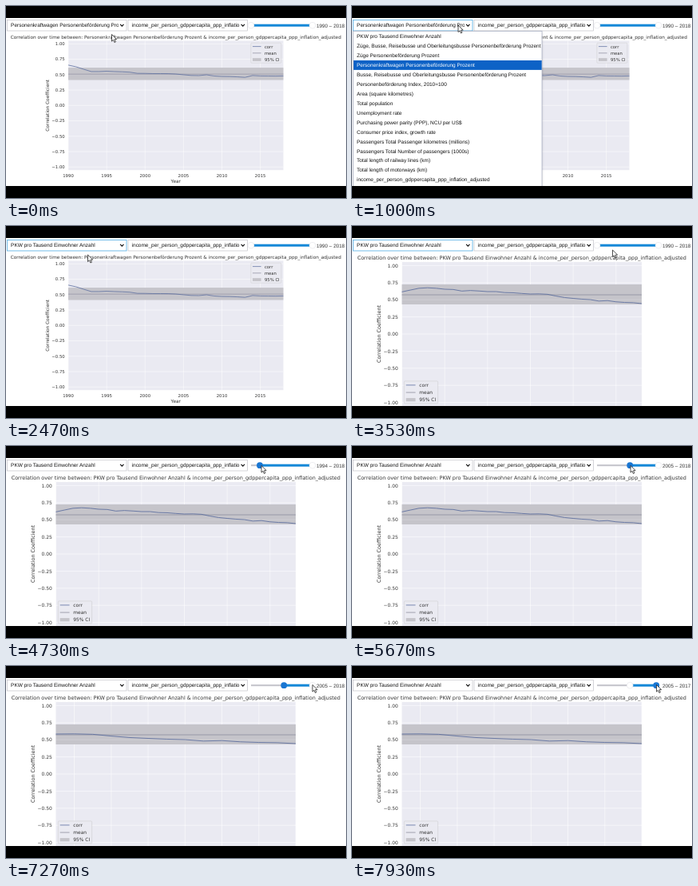
Animation of 426x240 px, one loop 8 s. Source, as an HTML page with a canvas:

```html
<!DOCTYPE html>
<html lang="de">
<head>
<meta charset="utf-8">
<title>Correlation over time</title>
<style>
html, body { margin: 0; width: 100%; height: 100%; overflow: hidden; background: #000; }
canvas { display: block; width: 426px; height: 240px; }
</style>
</head>
<body>
<canvas id="stage"></canvas>
<script>
const W = 426, H = 240, LOOP = 8000;
const SANS = '"Liberation Sans", Arial, sans-serif';
const PLOT = '"DejaVu Sans", sans-serif';
const UI = 6.47;

const canvas = document.getElementById('stage');
const dpr = window.devicePixelRatio || 1;
canvas.width = W * dpr;
canvas.height = H * dpr;
const ctx = canvas.getContext('2d');
ctx.scale(dpr, dpr);
ctx.textRendering = 'geometricPrecision';

const INCOME = 'income_per_person_gdppercapita_ppp_inflation_adjusted';
const OPTIONS = [
  'PKW pro Tausend Einwohner Anzahl',
  'Züge, Busse, Reisebusse und Oberleitungsbusse Personenbeförderung Prozent',
  'Züge Personenbeförderung Prozent',
  'Personenkraftwagen Personenbeförderung Prozent',
  'Busse, Reisebusse und Oberleitungsbusse Personenbeförderung Prozent',
  'Personenbeförderung Index, 2010=100',
  'Area (square kilometres)',
  'Total population',
  'Unemployment rate',
  'Purchasing power parity (PPP), NCU per US$',
  'Consumer price index, growth rate',
  'Passengers Total Passenger kilometres (millions)',
  'Passengers Total Number of passengers (1000s)',
  'Total length of railway lines (km)',
  'Total length of motorways (km)',
  INCOME
];

// Yearly correlation from 1990 to 2018, with mean and confidence band.
const CARS = {
  name: OPTIONS[3], mean: 0.508, band: [0.413, 0.613],
  corr: [.655, .628, .588, .55, .55, .556, .55, .546, .54, .521, .52, .517, .517, .516,
    .51, .498, .487, .485, .497, .478, .471, .469, .464, .456, .486, .479, .478, .477, .479]
};
const PKW = {
  name: OPTIONS[0], mean: 0.572, band: [0.432, 0.724],
  corr: [.615, .642, .668, .675, .668, .654, .65, .627, .635, .628, .619, .619, .605, .602,
    .592, .584, .586, .58, .554, .532, .52, .509, .502, .481, .488, .47, .461, .457, .444]
};

const SMALL = { pt: 0.484, x0: 78, x1: 347.5, y0: 124.3, unit: 77, top: true };
const LARGE = { pt: 0.539, x0: 62.5, x1: 363, y0: 135, unit: 85.6, top: false };

const T = { open: 560, pick: 2250, redraw: 2950, press: 4330, zoom: 5950, grab: 7330 };

// Keyframes: [time, value, value...]
const MOUSE = [
  [0, 132.5, 35.5], [400, 133, 24], [1250, 133, 24], [1850, 102.5, 36], [2650, 102.5, 36],
  [3450, 326.5, 30], [3750, 326.5, 30], [4150, 309, 24], [4400, 309, 24], [4730, 320, 24.5],
  [5500, 349, 24.5], [6000, 349, 24.5], [6450, 390, 23.5], [6850, 390, 23.5],
  [7250, 384, 23.5], [7500, 384, 23.5], [7850, 381.5, 23.5], [8000, 381.5, 23.5]
];
const FROM = [[4400, 1990], [4730, 1994], [5500, 2005]];
const TO = [[7500, 2018], [7850, 2017]];

function track(keys, t, i) {
  if (t <= keys[0][0]) return keys[0][i];
  for (let k = 1; k < keys.length; k++) {
    const a = keys[k - 1], b = keys[k];
    if (t <= b[0]) {
      const u = (t - a[0]) / (b[0] - a[0]);
      return a[i] + (b[i] - a[i]) * u * u * (3 - 2 * u);
    }
  }
  return keys[keys.length - 1][i];
}

function text(s, x, y, size, font, color, align = 'left') {
  ctx.font = size + 'px ' + font;
  ctx.fillStyle = color;
  ctx.textAlign = align;
  ctx.fillText(s, x, y);
}

function line(points, color, width) {
  ctx.beginPath();
  points.forEach(([x, y], i) => i ? ctx.lineTo(x, y) : ctx.moveTo(x, y));
  ctx.strokeStyle = color;
  ctx.lineWidth = width;
  ctx.stroke();
}

function rect(x, y, w, h, color) {
  ctx.fillStyle = color;
  ctx.fillRect(x, y, w, h);
}

const INK = '#333333', CORR = '#5b6d9e', MEAN = '#8d8d9f', BAND = '#c5c4ca';

function legend(f) {
  const { pt } = f;
  const w = 78.5 * pt, h = 52 * pt;
  const x = f.top ? f.x1 - 5.5 * pt - w : f.x0 + 5.2 * pt;
  const y = f.top ? f.y0 - 1.05 * f.unit + 5.5 * pt : f.y0 + 1.05 * f.unit - 5.5 * pt - h;
  ctx.beginPath();
  ctx.roundRect(x, y, w, h, 2 * pt);
  ctx.fillStyle = 'rgba(234,234,242,0.8)';
  ctx.fill();
  ctx.strokeStyle = '#cccccc';
  ctx.lineWidth = pt;
  ctx.stroke();
  const hx = x + 4.4 * pt, hw = 22 * pt;
  ['corr', 'mean', '95% CI'].forEach((label, i) => {
    const cy = y + (9.3 + 17 * i) * pt;
    if (i < 2) line([[hx, cy], [hx + hw, cy]], i ? MEAN : CORR, 1.5 * pt);
    else rect(hx, cy - 3.9 * pt, hw, 7.7 * pt, BAND);
    text(label, hx + 30.8 * pt, cy + 3.9 * pt, 11 * pt, PLOT, INK);
  });
}

function figure(f, data, start) {
  const { pt, x0, x1 } = f;
  const X = year => x0 + (year - start) / (2018 - start) * (x1 - x0);
  const Y = v => f.y0 - v * f.unit;
  const top = Y(1.05), bottom = Y(-1.05);
  rect(x0, top, x1 - x0, bottom - top, '#eaeaf2');

  const step = 2018 - start > 15 ? 5 : 2;
  for (let year = Math.ceil(start / step) * step; year <= 2018; year += step) {
    line([[X(year), top], [X(year), bottom]], '#fff', pt);
    text(year, X(year), bottom + 18.5 * pt, 11 * pt, PLOT, INK, 'center');
  }
  for (let i = -4; i <= 4; i++) {
    const y = Y(i / 4);
    line([[x0, y], [x1, y]], '#fff', pt);
    const label = (i < 0 ? '\u2212' : '') + Math.abs(i / 4).toFixed(2);
    text(label, x0 - 9 * pt, y + 4 * pt, 11 * pt, PLOT, INK, 'right');
  }

  const [lo, hi] = data.band;
  rect(x0, Y(hi), x1 - x0, Y(lo) - Y(hi), BAND);
  line([[x0, Y(0.5)], [x1, Y(0.5)]], 'rgba(255,255,255,0.3)', pt);
  line([[x0, Y(data.mean)], [x1, Y(data.mean)]], MEAN, 1.5 * pt);
  const first = start - 1990;
  line(data.corr.slice(first).map((v, i) => [X(start + i), Y(v)]), CORR, 1.6 * pt);
  legend(f);

  const mid = (x0 + x1) / 2;
  text(`Correlation over time between: ${data.name} & ${INCOME}`,
    mid, top - 6 * pt, 12 * pt, PLOT, INK, 'center');
  text('Year', mid, bottom + 33 * pt, 12 * pt, PLOT, INK, 'center');
  ctx.save();
  ctx.translate(x0 - 50 * pt, f.y0);
  ctx.rotate(-Math.PI / 2);
  text('Correlation Coefficient', 0, 0, 12 * pt, PLOT, INK, 'center');
  ctx.restore();
}

function select(x, label, focused) {
  ctx.fillStyle = '#fff';
  ctx.fillRect(x, 17.5, 149.5, 13.5);
  ctx.strokeStyle = focused ? '#64b5e6' : '#b8b8c0';
  ctx.lineWidth = focused ? 0.9 : 0.6;
  ctx.strokeRect(x, 17.5, 149.5, 13.5);
  ctx.save();
  ctx.beginPath();
  ctx.rect(x, 17, 139.5, 15);
  ctx.clip();
  text(label, x + 4.6, 26.3, UI, SANS, '#111');
  ctx.restore();
  line([[x + 141.6, 22.9], [x + 143.8, 25.1], [x + 146, 22.9]], '#111', 1.2);
}

function slider(from, to, active) {
  const X = year => 307 + (year - 1990) * 2.75;
  const y = 24.2;
  rect(307, y - 1, 77, 2, '#c3c3ca');
  rect(X(from), y - 1.5, X(to) - X(from), 3, '#1588d8');
  [from, to].forEach((year, i) => {
    const on = active === i;
    ctx.beginPath();
    ctx.arc(X(year), y, 3.9, 0, 7);
    ctx.fillStyle = on ? '#1976d2' : '#fff';
    ctx.fill();
    if (!on) {
      ctx.strokeStyle = '#dcdce2';
      ctx.lineWidth = 0.5;
      ctx.stroke();
    }
  });
  text(`${Math.round(from)} – ${Math.round(to)}`, 389, 26.5, 6.35, SANS, '#333');
}

function dropdown(hover) {
  ctx.save();
  ctx.shadowColor = 'rgba(0,0,0,0.35)';
  ctx.shadowBlur = 3 * dpr;
  rect(1.5, 31.5, 236.5, 200, '#fff');
  ctx.restore();
  ctx.strokeStyle = '#a9b0c4';
  ctx.lineWidth = 0.7;
  ctx.strokeRect(1.5, 31.5, 236.5, 200);
  OPTIONS.forEach((label, i) => {
    const cy = 38.2 + i * 11.93;
    if (i === hover) rect(2, cy - 6, 235.7, 11.9, '#0d62c6');
    text(label, 6, cy + 2.2, UI, SANS, i === hover ? '#fff' : '#111');
  });
}

function arrow(x, y) {
  ctx.beginPath();
  [[0, 0], [0, 8.6], [2, 6.8], [3.4, 10], [4.9, 9.3], [3.5, 6.2], [6.2, 6.1]]
    .forEach(([dx, dy], i) => i ? ctx.lineTo(x + dx, y + dy) : ctx.moveTo(x + dx, y + dy));
  ctx.closePath();
  ctx.fillStyle = '#fff';
  ctx.fill();
  ctx.strokeStyle = '#222';
  ctx.lineWidth = 0.8;
  ctx.stroke();
}

function beam(x, y) {
  line([[x, y - 4], [x, y + 4]], '#222', 0.9);
  for (const dy of [-4.2, 4.2]) line([[x - 1.8, y + dy], [x + 1.8, y + dy]], '#222', 0.8);
}

function draw(t) {
  rect(0, 0, W, H, '#fff');
  const mx = track(MOUSE, t, 1), my = track(MOUSE, t, 2);

  if (t < T.redraw) figure(SMALL, CARS, 1990);
  else figure(LARGE, PKW, t < T.zoom ? 1990 : 2005);

  select(1.5, t < T.pick ? CARS.name : PKW.name, t >= T.open && t < T.press);
  select(153, INCOME, false);
  const active = t >= T.grab ? 1 : t >= T.press ? 0 : -1;
  slider(track(FROM, t, 1), track(TO, t, 1), active);

  if (t >= T.open && t < T.pick) dropdown(my > 32 ? 0 : 3);
  if (mx > 387) beam(mx, my);
  else arrow(mx, my);

  rect(0, 0, W, 15, '#000');
  rect(0, 225, W, 15, '#000');
}

const begin = performance.now();
function tick() {
  draw((performance.now() - begin) % LOOP);
  requestAnimationFrame(tick);
}
tick();
</script>
</body>
</html>
```
